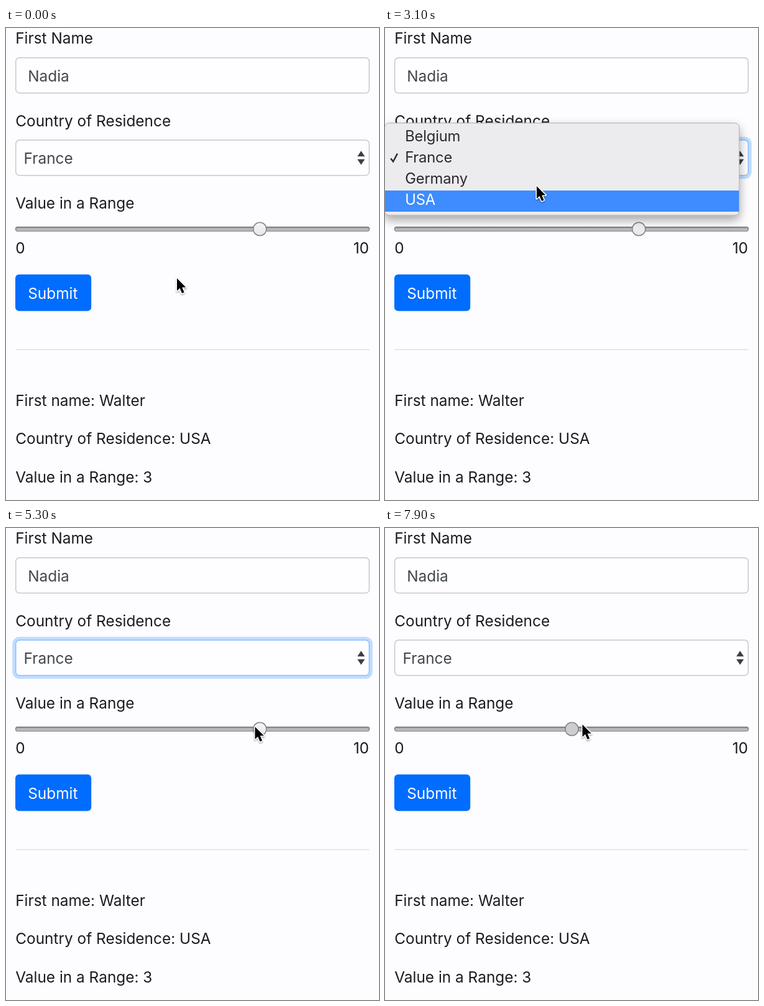
Recreate the animation shown at these times as an HTML page. Size 600x758 px, loop 8000 ms.

```html
<!DOCTYPE html>
<html lang="en">
<head>
<meta charset="utf-8">
<title>Form demo</title>
<style>
  html, body { margin: 0; width: 100%; height: 100%; overflow: hidden; background: #fdfcfe; }
  svg { display: block; width: 600px; height: 758px; }
  text { font: 440 24.4px Inter, "Open Sans", sans-serif; font-optical-sizing: none; fill: #191c22; }
  .field { fill: #fefdff; stroke: #c6c8cd; stroke-width: 1.5; }
  .value { fill: #42474e; }
  .menu text { font-size: 23.8px; letter-spacing: -.2px; fill: #2b2a2d; }
</style>
</head>
<body>
<svg viewBox="0 0 600 758" xmlns="http://www.w3.org/2000/svg">
  <defs>
    <linearGradient id="trackFill" x2="0" y2="1">
      <stop offset="0" stop-color="#969598"/>
      <stop offset=".45" stop-color="#b6b5b8"/>
      <stop offset="1" stop-color="#c2c1c4"/>
    </linearGradient>
    <linearGradient id="trackEdge" x2="0" y2="1">
      <stop offset="0" stop-color="#6c6b6e"/>
      <stop offset="1" stop-color="#99989b"/>
    </linearGradient>
    <linearGradient id="knobFill" x2="0" y2="1">
      <stop offset="0" stop-color="#f6f5f7"/>
      <stop offset="1" stop-color="#e5e4e7"/>
    </linearGradient>
    <filter id="menuShadow" x="-10%" y="-20%" width="120%" height="150%">
      <feDropShadow dx="0" dy="7" stdDeviation="8" flood-opacity=".36"/>
    </filter>
    <filter id="arrowShadow" x="-50%" y="-50%" width="200%" height="200%">
      <feDropShadow dx="0" dy="1.5" stdDeviation="1.3" flood-opacity=".38"/>
    </filter>
  </defs>
  <rect width="600" height="758" fill="#fdfcfe"/>

  <text x="15.2" y="25.3">First Name</text>
  <rect class="field" x="15.7" y="47.7" width="568.6" height="56.8" rx="6"/>
  <text class="value" x="35.2" y="85.5">Nadia</text>

  <text x="15.2" y="157.5">Country of Residence</text>
  <rect id="ring" x="12.7" y="177.2" width="574.6" height="62.6" rx="9" fill="none" stroke="#bfdeff" stroke-width="5"/>
  <rect id="select" class="field" x="15.7" y="179.9" width="568.6" height="56.8" rx="6"/>
  <text class="value" x="28.6" y="217.6">France</text>
  <path d="M565.2 206.2l6-9 6 9zM565.2 210.8l6 9 6-9z" fill="#3b4046"/>

  <text x="15.2" y="289.8">Value in a Range</text>
  <rect x="15.6" y="319.6" width="568.8" height="6.6" rx="3" fill="url(#trackFill)" stroke="url(#trackEdge)" stroke-width="1.4"/>
  <circle id="knob" cy="322.9" r="10.6" stroke="#858487" stroke-width="1.5"/>
  <text x="15.2" y="362">0</text>
  <text x="584" y="362" text-anchor="end">10</text>

  <rect x="15" y="395.8" width="122.2" height="58.6" rx="6" fill="#006dff"/>
  <text x="35.2" y="434.5" style="fill:#fff">Submit</text>
  <path d="M15.3 516.6H584.5" stroke="#dfdee2" stroke-width="1.5"/>

  <text x="15.2" y="606.5">First name: Walter</text>
  <text x="15.2" y="668">Country of Residence: USA</text>
  <text x="15.2" y="729.8">Value in a Range: 3</text>

  <g id="menu" class="menu">
    <rect x="-.5" y="152.7" width="570.3" height="148" rx="7" fill="#ecebee" stroke="#adacaf" filter="url(#menuShadow)"/>
    <rect id="band" width="569.4" height="34" fill="#3e8cff"/>
    <path id="check" d="M9.3 209.6l3.8 4.9L20 201.6" fill="none" stroke-width="2.4"/>
  </g>
  <g id="cursor" filter="url(#arrowShadow)">
    <path d="M0 0V20L4.6 15.8 8.1 23.9 11.6 22.4 8.2 14.4H14.4Z" fill="#000" stroke="#fff" stroke-width="3" paint-order="stroke" stroke-linejoin="round"/>
  </g>
</svg>
<script>
const LOOP = 8000, STEP = 100;
const OPEN = 1400, CLOSE = 4400, GRAB = 5800, DRAG = 6400;
const KNOB_MIN = 31, KNOB_STEP = 53.9;
const $ = id => document.getElementById(id);
const set = (id, attrs) => { for (const k in attrs) $(id).setAttribute(k, attrs[k]); };
const clamp = (v, a = 0, b = 1) => Math.min(b, Math.max(a, v));
const ease = u => u * u * (3 - 2 * u);

// cursor stops: time, x, y
const path = [
  [0, 275, 402], [300, 275, 402], [1100, 262, 212], [1900, 260, 210],
  [2400, 253, 203], [2600, 250, 206], [2900, 245, 273], [3000, 245, 269],
  [3100, 244, 254], [3700, 244, 200], [3800, 244, 198], [4500, 241, 206],
  [5200, 400, 320], [5500, 402, 317], [6200, 402, 317], [6300, 403, 317],
  [DRAG, 403, 317], [7400, 92, 317], [7600, 90, 317], [7700, 150, 317],
  [7800, 238, 317], [7900, 317.5, 315.5]
];

function cursorAt(t) {
  const i = path.findIndex(p => p[0] > t);
  if (i < 0) return path[path.length - 1].slice(1);
  if (i === 0) return path[0].slice(1);
  const a = path[i - 1], b = path[i];
  const k = ease((t - a[0]) / (b[0] - a[0]));
  return [a[1] + (b[1] - a[1]) * k, a[2] + (b[2] - a[2]) * k];
}

const items = ["Belgium", "France", "Germany", "USA"].map((name, i) => {
  const el = document.createElementNS("http://www.w3.org/2000/svg", "text");
  el.setAttribute("x", 32.2);
  el.setAttribute("y", 182 + 34 * i);
  el.textContent = name;
  $("menu").append(el);
  return el;
});

function draw(t) {
  const [x, y] = cursorAt(t);
  set("cursor", { transform: `translate(${x} ${y})` });

  // the highlight trails the pointer by one step
  const row = t >= CLOSE ? 1 : clamp(Math.floor((cursorAt(t - STEP)[1] - 159) / 34), 0, 3);
  items.forEach((el, i) => { el.style.fill = i === row ? "#fff" : ""; });
  set("band", { y: 159 + 34 * row });
  set("check", { stroke: row === 1 ? "#fff" : "#2b2a2d" });
  set("menu", { opacity: t < OPEN ? 0 : clamp(1 - (t - CLOSE) / 240) });

  const focus = clamp((t - OPEN + STEP) / 150) * clamp(1 - (t - GRAB + STEP) / 200);
  set("ring", { opacity: focus });
  $("select").style.stroke = focus > .5 ? "#86bfff" : "";

  const value = t < DRAG ? 7 : clamp(Math.round((x + 5 - KNOB_MIN) / KNOB_STEP), 0, 10);
  set("knob", {
    cx: KNOB_MIN + KNOB_STEP * value,
    fill: t < GRAB ? "url(#knobFill)" : "#cdccd0"
  });
}

const start = performance.now();
function tick() {
  const t = (performance.now() - start) % LOOP;
  draw(Math.floor(t / STEP) * STEP);
  requestAnimationFrame(tick);
}
tick();
</script>
</body>
</html>
```
